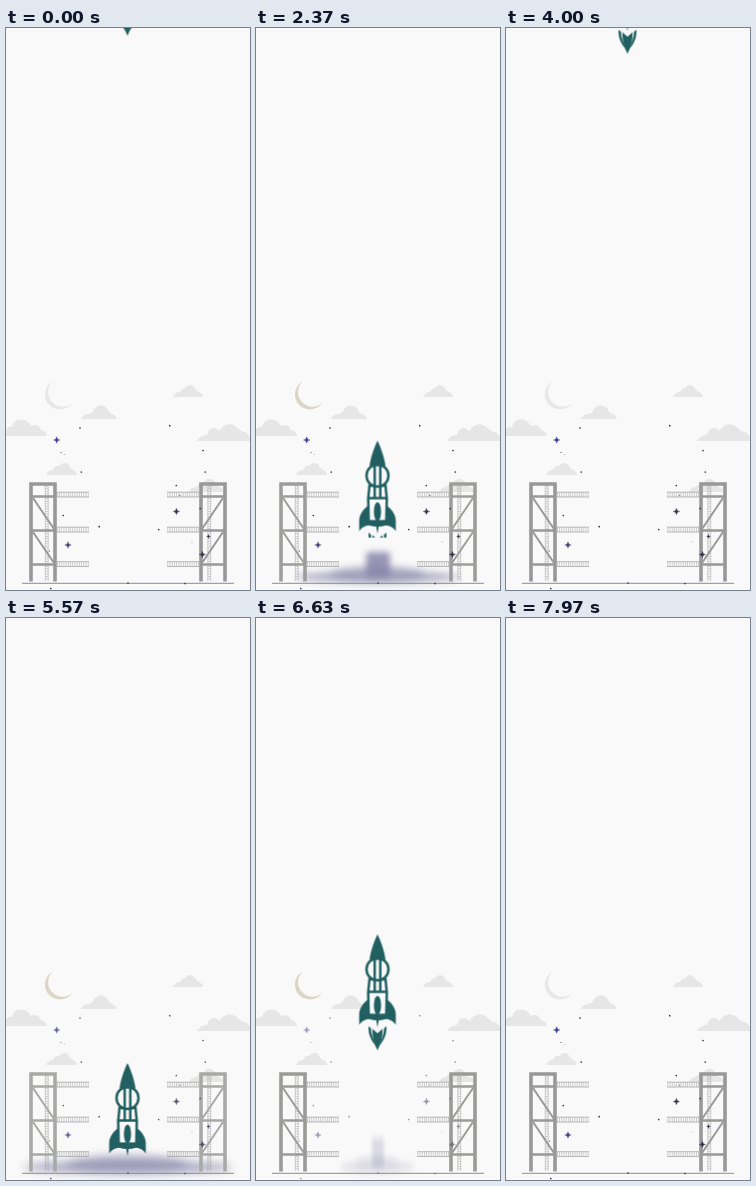
An HTML page for the animation above (8000 ms loop, 244x562 px).

```html
<!DOCTYPE html>
<html lang="en">
<head>
<meta charset="utf-8">
<title>Rocket launch</title>
<style>
  html, body { margin: 0; width: 100%; height: 100%; overflow: hidden; background: #f9f9f9; }
  svg { display: block; width: 100vw; height: 100vh; }
  .anim { animation: 8s linear infinite; }
  .cloud { fill: #e6e6e6; }
  .rocket { animation-name: fly, appear; }
  .flame { animation-name: ignite; }
  .smoke { animation-name: spread; transform-origin: 121.5px 547px; }
  .column { animation-name: puff; transform-origin: 122px 549px; }
  .moon { animation-name: moon; }
  .tower { animation-name: steel; stroke: #989898; fill: none; }
  .stars { animation-name: twinkle; }

  /* two launches per loop, the second 45.8% after the first */
  @keyframes fly {
    0% { transform: translateY(-81px); }
    .6% { transform: translateY(-160px); }
    .61%, 52% { transform: translateY(445px); }
    24.38%, 70.18% { transform: translateY(445px); animation-timing-function: cubic-bezier(.37, 0, .63, 1); }
    41.5%, 87.3% { transform: translateY(293px); }
    43.79%, 89.59% { transform: translateY(293px); animation-timing-function: cubic-bezier(.333, 0, .667, .333); }
    51.29%, 97.09%, 100% { transform: translateY(-264px); animation-timing-function: step-end; }
  }
  @keyframes appear {
    0%, .6%, 10%, 51.29%, 60%, 100% { opacity: 1; }
    .61%, 3.4%, 51.3%, 53.75% { opacity: 0; }
  }
  @keyframes ignite {
    0%, .6%, 33%, 51.3%, 78.9%, 100% { clip-path: inset(0 0 0 0); }
    .61%, 28.75%, 51.31%, 74.55% { clip-path: inset(0 0 100% 0); }
  }
  @keyframes spread {
    0%, 14.5%, 60.3% { opacity: 0; transform: scale(.2, .6); }
    23.8%, 69.6% { opacity: .9; transform: scale(1, 1); }
    29.6%, 75.4% { opacity: .85; transform: scale(.78, .9); }
    37.1%, 82.9% { opacity: .28; transform: scale(.36, .9); }
    40.6%, 86.4%, 100% { opacity: 0; transform: scale(.25, .8); }
  }
  @keyframes puff {
    0%, 25%, 70.8% { opacity: 0; transform: scale(1.2, .2); }
    29.6%, 75.4% { opacity: .85; transform: scale(1, 1); }
    37.1%, 82.9% { opacity: .25; transform: scale(.5, 1.15); }
    40.6%, 86.4%, 100% { opacity: 0; transform: scale(.4, 1.2); }
  }
  @keyframes moon {
    0%, 3.4%, 47%, 53.75%, 94%, 100% { fill: #e7e7e7; }
    10%, 45%, 60%, 92.5% { fill: #dad5c4; }
  }
  @keyframes steel {
    0%, 14%, 42%, 60%, 88%, 100% { stroke: #989898; }
    23.8%, 69.6% { stroke: #a8a8a6; }
    29.6%, 75.4% { stroke: #9d9d9b; }
  }
  @keyframes twinkle {
    0%, 10%, 30%, 49%, 56%, 75.8%, 94.8%, 100% { opacity: 1; }
    23.8%, 69.6% { opacity: .8; }
    36%, 44.5%, 81.8%, 90.3% { opacity: .5; }
  }
</style>
</head>
<body>
<svg viewBox="0 0 244 562" preserveAspectRatio="none">
  <defs>
    <filter id="blur" x="-30%" y="-100%" width="160%" height="300%"><feGaussianBlur stdDeviation="4"/></filter>
    <filter id="soft" x="-50%" y="-50%" width="200%" height="200%"><feGaussianBlur stdDeviation="3"/></filter>
    <path id="spark" d="M0-3.2Q.3-.3 3.2 0Q.3.3 0 3.2Q-.3.3-3.2 0Q-.3-.3 0-3.2Z" stroke-width=".4"/>
    <g id="frame">
      <path d="M25 553.5V456H49V553.5" stroke-width="3.6"/>
      <path d="M26 468.5H48M26 502.5H48M26 536.5H48" stroke-width="2.4"/>
      <path d="M27 470L48 501M27 504L48 535" stroke-width="2"/>
    </g>
    <g id="lattice" fill="none" stroke="#a9a9a9">
      <path d="M39.3 458V553M42.2 458V553" stroke-width=".6"/>
      <path d="M40.75 458V553" stroke-width="2.6" stroke-dasharray=".7 1.8" opacity=".7"/>
      <path d="M51 464.2H83M51 469H83M51 499.2H83M51 504H83M51 533.7H83M51 538.5H83" stroke-width=".8"/>
      <path d="M51 466.6H83M51 501.6H83M51 536.1H83" stroke-width="4.6" stroke-dasharray=".7 1.5" opacity=".75"/>
    </g>
  </defs>
  <rect width="244" height="562" fill="#f9f9f9"/>

  <path class="anim moon" d="M47 353.2A15 15 0 1 0 66.3 375A14 14 0 0 1 47 353.2Z"/>
  <g class="cloud">
    <path d="M0 408V401Q3 398 6 399Q8 391 15 391.5Q21 391 25 398Q32 395 35 402Q40 403 41 408Z"/>
    <path d="M75 391Q77 386 83 386Q87 385 88 381Q94 374 101 380Q103 385 106 386Q110 387 111 391Z"/>
    <path d="M40 447Q42 442 47 442Q49 437 53 438Q57 433 62 436Q65 442 68 442Q71 444 71 447Z"/>
    <path d="M167 369Q169 364 174 364Q176 360 179 360Q184 354 189 360Q191 364 193 364Q197 366 197 369Z"/>
    <path d="M191 413Q194 407 201 407Q203 399 209 400Q212 401 213 403Q222 391 232 400Q235 404 239 404Q243 406 244 409V413Z"/>
    <path d="M183 464Q185 459 190 459Q193 455 197 455Q203 447 209 454Q211 459 214 459Q218 461 218 464Z"/>
  </g>

  <g fill="#8583a8">
    <g class="anim smoke" filter="url(#blur)">
      <ellipse cx="121.5" cy="549" rx="104" ry="7" opacity=".7"/>
      <ellipse cx="121.5" cy="546" rx="62" ry="9" opacity=".65"/>
    </g>
    <g class="anim column" filter="url(#soft)"><rect x="110" y="524" width="24" height="25" rx="3"/></g>
  </g>

  <use href="#lattice"/>
  <use href="#lattice" transform="translate(244) scale(-1 1)"/>
  <g class="anim tower">
    <use href="#frame"/>
    <use href="#frame" transform="translate(244) scale(-1 1)"/>
  </g>
  <path d="M16 555.3H228" stroke="#8b8b8b" stroke-width="1"/>

  <g class="anim stars" id="stars" fill="#34344f" stroke="#34344f">
    <use href="#spark" x="50.7" y="412" fill="#3c3c94" stroke="#3c3c94"/>
    <use href="#spark" x="62" y="517" fill="#3f3f78" stroke="#3f3f78"/>
    <use href="#spark" x="170.4" y="483.5"/>
    <use href="#spark" x="196.4" y="526.5"/>
    <use href="#spark" transform="translate(202.5 508.5) scale(.6)"/>
    <path stroke-width="1.7" stroke-linecap="round" d="M74 400h.01M75.3 444h.01M57.3 487.5h.01M93.2 498.7h.01M163.7 397.7h.01M197 422.5h.01M199.3 444h.01M170.3 457.5h.01M152.7 501.5h.01M194.2 480.5h.01M44.8 560.5h.01M122 555h.01M179 555.5h.01"/>
    <path stroke-width="1.1" stroke-linecap="round" d="M55 424.5h.01M173.7 467.3h.01M43.5 523h.01"/>
    <path stroke-width=".7" stroke-linecap="round" d="M58.3 426.5h.01M186 514h.01" opacity=".7"/>
  </g>

  <g transform="translate(121.5)">
    <g class="anim rocket" fill="#215f60">
      <g fill="#f9f9f9" stroke="#215f60" stroke-width="2.5">
        <path d="M-8 45L-9.3 58L-8.8 81H8.8L9.3 58L8 45Z"/>
        <circle cy="35" r="11"/>
        <path d="M-2.8 24V57M2.8 24V57M-9 57.5H9" fill="none"/>
      </g>
      <path d="M0 0C3 6 7 17 8 25.5H-8C-7 17-3 6 0 0Z"/>
      <path id="fin" d="M-9 65C-14 68-18.3 74-18.3 80V90.5C-16 87-13 85-8 84.5Z"/>
      <use href="#fin" transform="scale(-1 1)"/>
      <path d="M-9 79.5H9V84.5Q0 87.5-9 84.5Z"/>
      <ellipse cy="71" rx="3.6" ry="9.5"/>
      <path d="M-2 82H2L0 93Z"/>
      <g class="anim flame">
        <path d="M-9 92C-9.3 101-6 107-1 112C-4 106-6.5 100-6.5 94Z"/>
        <path d="M9 92C9.3 101 6 107 1 112C4 106 6.5 100 6.5 94Z"/>
        <path d="M-5 94.5L0 99L5 94.5C5.3 104 3 110 0 116C-3 110-5.3 104-5 94.5Z"/>
      </g>
    </g>
  </g>
</svg>
</body>
</html>
```
